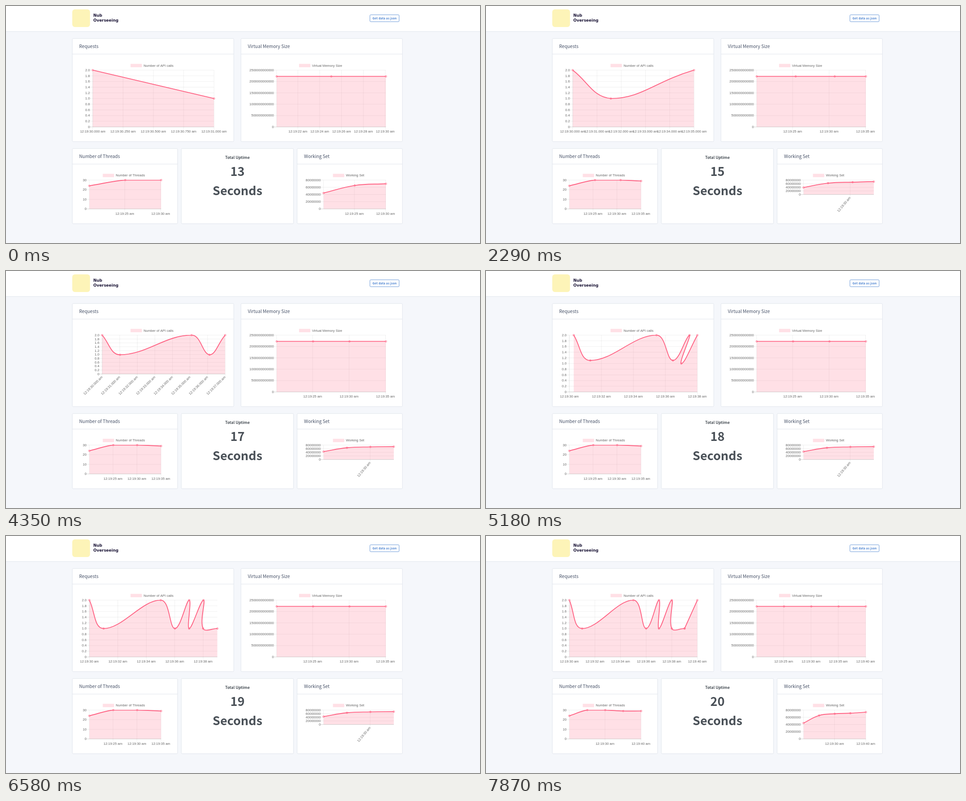
Animation, 1056 px wide and 530 px high, one loop 8 s. Source, as an HTML page with a canvas:

```html
<!DOCTYPE html>
<html lang="en">
<head>
<meta charset="utf-8">
<title>Monitoring dashboard</title>
<style>
  html, body { margin: 0; width: 100%; height: 100%; overflow: hidden; background: #f5f7fb; }
  svg, canvas { position: absolute; left: 0; top: 0; width: 1056px; height: 530px; }
  text { font-family: "Noto Sans CJK JP", "Noto Sans CJK SC", "Noto Sans CJK", "Noto Sans", sans-serif; fill: #495057; }
  .card rect { fill: #fff; stroke: #e1e6ed; }
  .card path { stroke: #e1e6ed; }
  .card { filter: drop-shadow(0 .6px .6px rgba(0, 0, 0, .05)); }
  .title { font-size: 10.15px; fill: #475268; }
  .brand { font: bold 8.75px "DejaVu Sans", sans-serif; fill: #1b1536; }
  .mid { text-anchor: middle; font-weight: 700; }
  .big { font-size: 26.95px; }
  .button { font-size: 6.55px; letter-spacing: .2px; fill: #467fcf; }
</style>
</head>
<body>
<svg viewBox="0 0 1056 530">
  <rect width="1056" height="57" fill="#fff"/>
  <path d="M0 57H1056" stroke="#e0e5ec"/>
  <rect x="147.6" y="7.5" width="39.6" height="39.5" rx="6" fill="#fdf4b8"/>
  <text class="brand" x="194.5" y="23.5">Nub</text>
  <text class="brand" x="194.5" y="35.4">Overseeing</text>
  <rect x="810.8" y="19.7" width="65" height="15.4" rx="1.9" fill="#fff" stroke="#467fcf" stroke-width=".8"/>
  <text class="mid button" x="843.4" y="29.8">Get data as json</text>

  <g class="card"><rect x="147.8" y="72.8" width="359.7" height="230.4" rx="1.9"/><path d="M148 107.5H507"/></g>
  <g class="card"><rect x="523.4" y="72.8" width="359.7" height="230.4" rx="1.9"/><path d="M524 107.5H883"/></g>
  <g class="card"><rect x="147.8" y="318.8" width="234.4" height="168" rx="1.9"/><path d="M148 353.5H382"/></g>
  <g class="card"><rect x="390.6" y="318.8" width="250" height="168" rx="1.9"/></g>
  <g class="card"><rect x="648.6" y="318.8" width="234.5" height="168" rx="1.9"/><path d="M649 353.5H883"/></g>

  <text class="title" x="163" y="94.4">Requests</text>
  <text class="title" x="538.7" y="94.4">Virtual Memory Size</text>
  <text class="title" x="163" y="340.2">Number of Threads</text>
  <text class="title" x="664" y="340.2">Working Set</text>

  <text class="mid" x="515.6" y="342.4" font-size="8.7">Total Uptime</text>
  <text class="mid big" x="515.7" y="379.7" id="count">13</text>
  <text class="mid big" x="515.7" y="422.6">Seconds</text>
</svg>
<canvas id="stage" width="1056" height="530"></canvas>

<script>
const LOOP = 8000;
const DURATION = 1000;
const SCALE = 1056 / 1680;
const FONT = 12 * SCALE;
const TICK = 10 * SCALE;
const PINK = 'rgb(255,99,132)';
const PALE = 'rgba(255,99,132,.2)';
const UPTIME_START = 13;
const UPTIME_MARKS = [860, 1840, 2880, 3920, 4900, 5950, 6860];
const POLL = [0, 1905, 6940]; // slow charts refresh

const counter = document.getElementById('count');
const ctx = document.getElementById('stage').getContext('2d');

const plain = v => String(v);

// stage: start time, visible points, plot edges, time span, tick step
const slowStages = (left, rights, bottoms, steps, rots = []) => POLL.map((at, i) => ({
  at, n: 3 + i, left, right: rights[i], bottom: bottoms[i],
  from: 20.06, to: 30.06 + 5 * i, step: steps[i], rot: rots[i] || 0
}));

const requestStage = (at, n, span, step, left, right, bottom, rot, ms) =>
  ({ at, n, left, right, bottom, from: 30, to: 30 + span, step, rot, ms });

const slowPoints = values => values.map((v, i) => [20.06 + 5 * i, v]);

const charts = [
  {
    name: 'Number of API calls', legendX: 277.5, top: 143.4, max: 2, yStep: .2,
    format: v => v ? v.toFixed(1) : '0',
    data: [[30, 2], [31, 1], [35, 2], [36, 1], [37, 2], [37, 1], [38, 2], [38, 1], [39, 1], [39, 1], [40, 2]],
    stages: [
      requestStage(0, 2, 1, .25, 193.2, 463.4, 270.4, 0, true),
      requestStage(1905, 3, 5, 1, 193.2, 463.4, 270.4, 0, true),
      requestStage(2955, 4, 6, 1, 214.2, 488.3, 239.9, 32, true),
      requestStage(3922, 5, 7, 1, 214.2, 488.3, 230.2, 44.5, true),
      requestStage(4945, 7, 8, 2, 185.7, 470.9, 270.4, 0),
      requestStage(5965, 9, 9, 2, 185.7, 470.9, 270.4, 0),
      requestStage(6940, 11, 10, 2, 185.7, 470.9, 270.4, 0)
    ]
  },
  {
    name: 'Virtual Memory Size', legendX: 652.9, top: 143.4, max: 2.5e12, yStep: 5e11, format: plain,
    data: slowPoints(Array(5).fill(2.224e12)),
    stages: slowStages(603, [846.4, 846.4, 846.4], [270.4, 270.4, 270.4], [2, 5, 5])
  },
  {
    name: 'Number of Threads', legendX: 215.6, top: 389.2, max: 30, yStep: 10, format: plain,
    data: slowPoints([24, 30, 30, 29, 29]),
    stages: slowStages(185.6, [345.6, 345.6, 345.6], [453.8, 453.8, 453.8], [5, 5, 10])
  },
  {
    name: 'Working Set', legendX: 728.4, top: 389.2, max: 8e7, yStep: 2e7, format: plain,
    data: slowPoints([4.4e7, 6.5e7, 6.97e7, 7.12e7, 7.42e7]),
    stages: slowStages(707.4, [846.4, 864, 846.4], [453.8, 421.6, 453.8], [5, 10, 10], [0, 50, 0])
  }
];

const clamp = (v, lo, hi) => Math.min(hi, Math.max(lo, v));
const mix = (a, b, k) => a + (b - a) * k;
const easeOutQuart = k => 1 - (1 - k) ** 4;
const xAt = (s, time) => mix(s.left, s.right, (time - s.from) / (s.to - s.from));
const yAt = (chart, s, v) => mix(s.bottom, chart.top, v / chart.max);

// Points with spline handles: [x, y, inX, inY, outX, outY]
function layout(chart, s) {
  const pts = chart.data.slice(0, s.n).map(([time, v]) => [xAt(s, time), yAt(chart, s, v)]);
  return pts.map((p, i) => {
    const prev = pts[i - 1] || p, next = pts[i + 1] || p;
    const d1 = Math.hypot(p[0] - prev[0], p[1] - prev[1]);
    const d2 = Math.hypot(next[0] - p[0], next[1] - p[1]);
    const k = .4 / (d1 + d2 || 1);
    const handle = d => [
      clamp(p[0] + d * k * (next[0] - prev[0]), s.left, s.right),
      clamp(p[1] + d * k * (next[1] - prev[1]), chart.top, s.bottom)
    ];
    return [...p, ...handle(-d1), ...handle(d2)];
  });
}

for (const chart of charts)
  for (const s of chart.stages) s.points = layout(chart, s);

function line(x1, y1, x2, y2, alpha = .1) {
  ctx.strokeStyle = `rgba(0,0,0,${alpha})`;
  ctx.lineWidth = SCALE;
  ctx.beginPath();
  ctx.moveTo(x1, y1);
  ctx.lineTo(x2, y2);
  ctx.stroke();
}

function label(str, x, y, align, angle = 0) {
  ctx.save();
  ctx.translate(x, y);
  ctx.rotate(-angle * Math.PI / 180);
  ctx.textAlign = align;
  ctx.fillStyle = '#666';
  ctx.fillText(str, 0, 0);
  ctx.restore();
}

function drawAxes(chart, s) {
  for (let i = 0; i <= Math.round(chart.max / chart.yStep); i++) {
    const v = i * chart.yStep, y = yAt(chart, s, v);
    line(s.left - TICK, y, s.right, y, i ? .1 : .25);
    label(chart.format(v), s.left - TICK, y + .4, 'right');
  }
  for (let time = Math.ceil(s.from / s.step) * s.step; time <= s.to; time += s.step) {
    const x = xAt(s, time), sec = Math.floor(time);
    const ms = s.ms ? '.' + String((time - sec) * 1000).padStart(3, '0') : '';
    const str = `12:19:${sec}${ms} am`;
    line(x, chart.top, x, s.bottom + TICK);
    if (s.rot) label(str, x, s.bottom + TICK, 'right', s.rot);
    else label(str, x, s.bottom + 10.9, 'center');
  }
  line(s.left, chart.top, s.left, s.bottom);
  line(s.left, s.bottom, s.right, s.bottom);
}

function drawSeries(chart, s, pts) {
  const curve = new Path2D();
  pts.forEach((p, i) => {
    if (!i) return curve.moveTo(p[0], p[1]);
    const q = pts[i - 1];
    curve.bezierCurveTo(q[4], q[5], p[2], p[3], p[0], p[1]);
  });
  const area = new Path2D(curve);
  area.lineTo(pts[pts.length - 1][0], s.bottom);
  area.lineTo(pts[0][0], s.bottom);
  area.closePath();

  ctx.save();
  ctx.beginPath();
  ctx.rect(s.left, chart.top - .4, s.right - s.left, s.bottom - chart.top + .4);
  ctx.clip();
  ctx.fillStyle = PALE;
  ctx.fill(area);
  ctx.strokeStyle = PINK;
  ctx.lineWidth = 3 * SCALE;
  ctx.stroke(curve);
  ctx.restore();

  ctx.fillStyle = PALE;
  ctx.strokeStyle = PINK;
  ctx.lineWidth = .75;
  for (const [x, y] of pts) {
    ctx.beginPath();
    ctx.arc(x, y, 3 * SCALE, 0, 2 * Math.PI);
    ctx.fill();
    ctx.stroke();
  }
}

function drawChart(chart, t) {
  const i = chart.stages.findLastIndex(s => t >= s.at);
  const s = chart.stages[i];
  const old = i ? chart.stages[i - 1].points : [];
  const k = easeOutQuart(clamp((t - s.at) / DURATION, 0, 1));
  const pts = s.points.map((p, j) => old[j] ? p.map((v, c) => mix(old[j][c], v, k)) : p);

  const y = chart.top - 10.2;
  ctx.fillStyle = PALE;
  ctx.fillRect(chart.legendX, y - FONT / 2, 40 * SCALE, FONT);
  label(chart.name, chart.legendX + 46 * SCALE, y + .4, 'left');
  drawAxes(chart, s);
  drawSeries(chart, s, pts);
}

let start;
function frame(now) {
  start ??= now;
  const t = (now - start) % LOOP;
  ctx.clearRect(0, 0, 1056, 530);
  ctx.font = `${FONT}px "Liberation Sans", Arial, sans-serif`;
  ctx.textBaseline = 'middle';
  for (const chart of charts) drawChart(chart, t);
  const seconds = String(UPTIME_START + UPTIME_MARKS.filter(m => t >= m).length);
  if (counter.textContent !== seconds) counter.textContent = seconds;
  requestAnimationFrame(frame);
}
requestAnimationFrame(frame);
</script>
</body>
</html>
```
